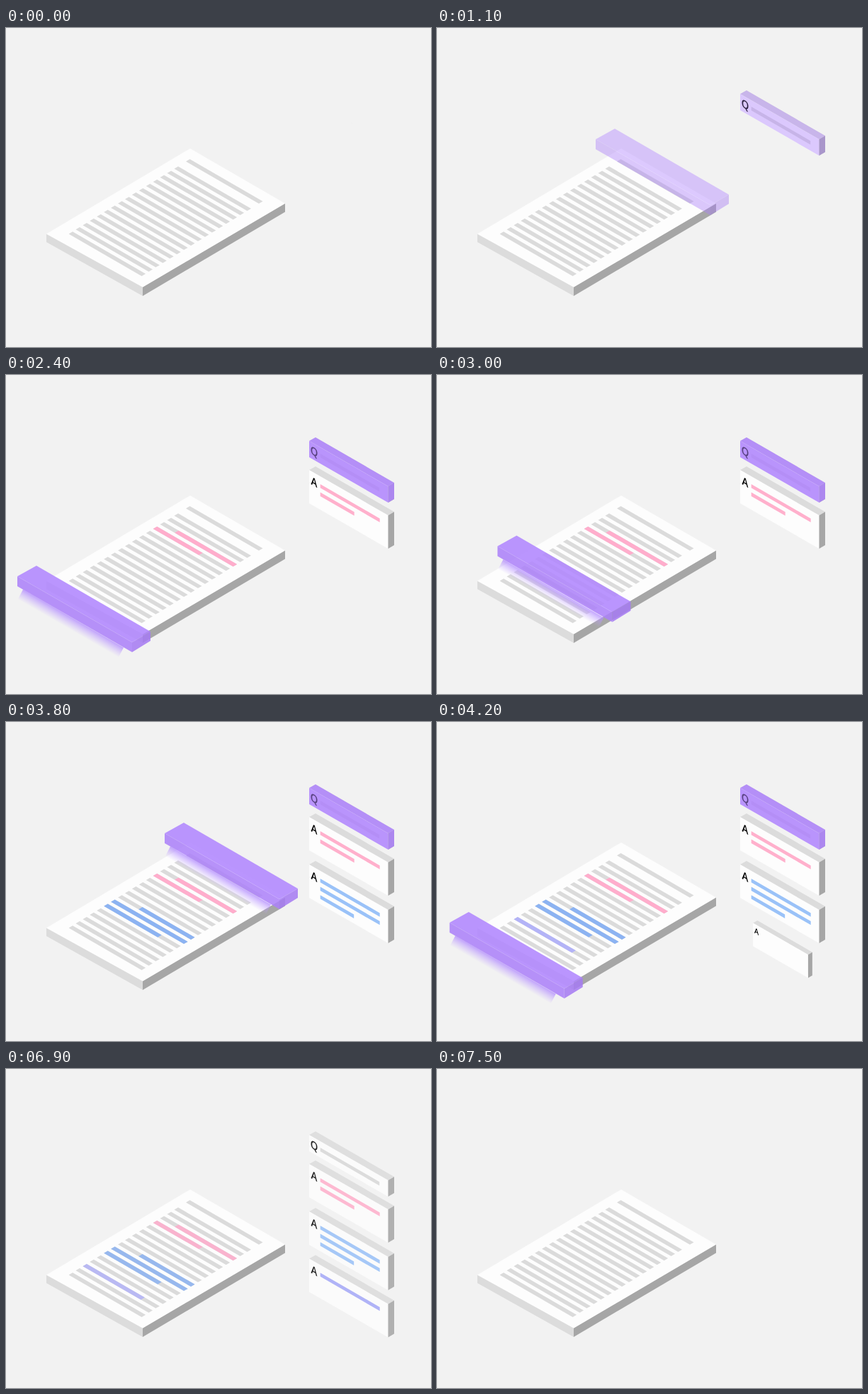
An HTML page for the animation above (8 s loop, 600x450 px).

```html
<!DOCTYPE html>
<html lang="en">
<head>
<meta charset="utf-8">
<title>Document scan</title>
<style>
html, body { margin: 0; width: 100%; height: 100%; overflow: hidden; background: #f2f2f2; }
svg { display: block; width: 600px; height: 450px; }
text { font: 600 15.5px "Open Sans", sans-serif; text-anchor: middle; }
</style>
</head>
<body>
<svg id="stage" viewBox="0 0 600 450">
  <defs>
    <linearGradient id="glow" gradientUnits="userSpaceOnUse" x1="8" y1="4.6" x2=".5" y2="17.6">
      <stop offset="0" stop-color="#b088ff" stop-opacity=".75"/>
      <stop offset="1" stop-color="#c4a6ff" stop-opacity=".04"/>
    </linearGradient>
  </defs>
</svg>
<script>
const LOOP = 8000, SLOPE = .577, ROW_LENGTH = 103;
const stage = document.getElementById('stage');

const clamp = x => Math.max(0, Math.min(1, x));
const span = (t, a, b) => clamp((t - a) / (b - a));
const easeOut = u => 1 - (1 - u) ** 2;
const easeInOut = u => u < .5 ? 4 * u ** 3 : 1 - 4 * (1 - u) ** 3;

function add(parent, tag, attrs = {}) {
  const el = document.createElementNS('http://www.w3.org/2000/svg', tag);
  for (const key in attrs) el.setAttribute(key, attrs[key]);
  parent.appendChild(el);
  return el;
}
const poly = (parent, points, fill) => add(parent, 'polygon', { points, fill });
const fade = (el, value) => el.setAttribute('opacity', value);

// Page
poly(stage, '57,290.5 193,365.5 193,378 57,302', '#dcdcdc');
poly(stage, '193,365.5 394,247.5 394,259.5 193,378', '#a6a6a6');
poly(stage, '260,170 394,247.5 193,365.5 57,290.5', '#fdfdfd');

function row(parent, i, from, to, fill) {
  const x = 237.5 - 9.93 * i + from, y = 198.5 + 6.13 * i + from * SLOPE, w = to - from;
  add(parent, 'path', { fill, d: `M${x},${y}l5.5,-3.2l${w},${w * SLOPE}l-5.5,3.2z` });
}
row(stage, -1.66, 0, ROW_LENGTH, '#dbdbdb');
for (let i = 0; i < 16; i++) row(stage, i, 0, ROW_LENGTH, '#dbdbdb');

// Highlights: rows as [index, from, to], shown when the scanner reaches them
const marks = [
  { at: 1960, fill: '#ffadcc', rows: [[2, 20.5, 103], [3, 0, 64.5]] },
  { at: 3030, fill: '#8cb3f2', rows: [[8, 29, 103], [9, 0, 103], [10, 0, 76]] },
  { at: 4045, fill: '#b3b3f7', rows: [[13, 0, 82]] }
];
for (const mark of marks) {
  mark.el = add(stage, 'g');
  for (const r of mark.rows) row(mark.el, ...r, mark.fill);
}

// Cards
function box(parent, top, height, colors) {
  const y = top + 5, b = y + height;
  poly(parent, `428,${y} 437,${top} 548,${top + 64} 539.5,${y + 64}`, colors[0]);
  poly(parent, `428,${y} 539.5,${y + 64} 539.5,${b + 64} 428,${b}`, colors[1]);
  poly(parent, `539.5,${y + 64} 548,${top + 64} 548,${top + 64 + height} 539.5,${b + 64}`, colors[2]);
}
const label = (parent, text, y) =>
  add(parent, 'text', { transform: `matrix(.866,.5,0,1,435,${y})` }).textContent = text;

const GREYS = ['#dcdcdc', '#fdfdfd', '#a6a6a6'];
const cards = [
  { text: 'Q', top: 88, height: 23, pop: [0, 300], draw: [400, 700], fill: '#d9d9d9', lines: [83.5] },
  { text: 'A', top: 129, height: 47, pop: [2000, 2200], draw: [2200, 2400], fill: '#ffb0cc', lines: [84, 48] },
  { text: 'A', top: 196, height: 47, pop: [3060, 3260], draw: [3260, 3500], fill: '#9ac2f8', lines: [84, 84, 47.5] },
  { text: 'A', top: 262.5, height: 47, pop: [4120, 4300], draw: [4300, 4550], fill: '#a5a9f8', lines: [84] }
];
for (const card of cards) {
  card.el = add(stage, 'g');
  card.mid = card.top + (card.height + 69) / 2;
  box(card.el, card.top, card.height, GREYS);
  label(card.el, card.text, card.top + (card.text === 'Q' ? 25.5 : 27.5));
  card.paths = card.lines.map(() => add(card.el, 'path', { fill: card.fill }));
}

const tint = add(stage, 'g');
box(add(tint, 'g', { opacity: .85 }), 88, 23, Array(3).fill('#ae82fc'));
label(add(tint, 'g', { opacity: .4 }), 'Q', 113.5);

// Scanner, placed by its front left bottom corner
const scanner = add(stage, 'g');
const beam = poly(scanner, '8,4.6 150,86.6 143,100 1,18', 'url(#glow)');
const bar = add(scanner, 'g', { opacity: .86 });
poly(bar, '0,-14 27,-29 188,64 162,79', '#b085ff');
poly(bar, '0,-14 162,79 162,93 0,0', '#ac81f9');
poly(bar, '162,79 188,64 188,77 162,93', '#a67bf3');

function drawCard(card, t, alpha) {
  const s = easeOut(span(t, ...card.pop));
  card.el.setAttribute('transform',
    `translate(488 ${card.mid}) scale(${s}) translate(-488 ${-card.mid})`);
  fade(card.el, s > 0 ? alpha : 0);
  const drawn = span(t, ...card.draw) * card.lines.length;
  card.paths.forEach((path, i) => {
    const w = card.lines[i] * clamp(drawn - i);
    const y = card.top + (card.text === 'Q' ? 23 : 25) + i * 11.6;
    path.setAttribute('d', w ? `M443.7,${y}l${w},${w * SLOPE}v5.3l${-w},${-w * SLOPE}z` : '');
  });
}

function draw(t) {
  const alpha = 1 - span(t, 6800, 7500);
  const active = span(t, 900, 1300) * (1 - span(t, 4900, 5300));
  const pass = start => easeInOut(span(t, start, start + 460));
  const p = pass(1800) - pass(2800) + pass(3800);

  for (const mark of marks) fade(mark.el, span(t, mark.at, mark.at + 80) * alpha);
  for (const card of cards) drawCard(card, t, alpha);
  fade(tint, active);
  fade(scanner, active);
  fade(beam, span(t, 1300, 1800));
  scanner.setAttribute('transform', `translate(${224 - 208 * p} ${171 + 127 * p})`);
}

const begin = performance.now();
function tick() {
  draw((performance.now() - begin) % LOOP);
  requestAnimationFrame(tick);
}
tick();
</script>
</body>
</html>
```
